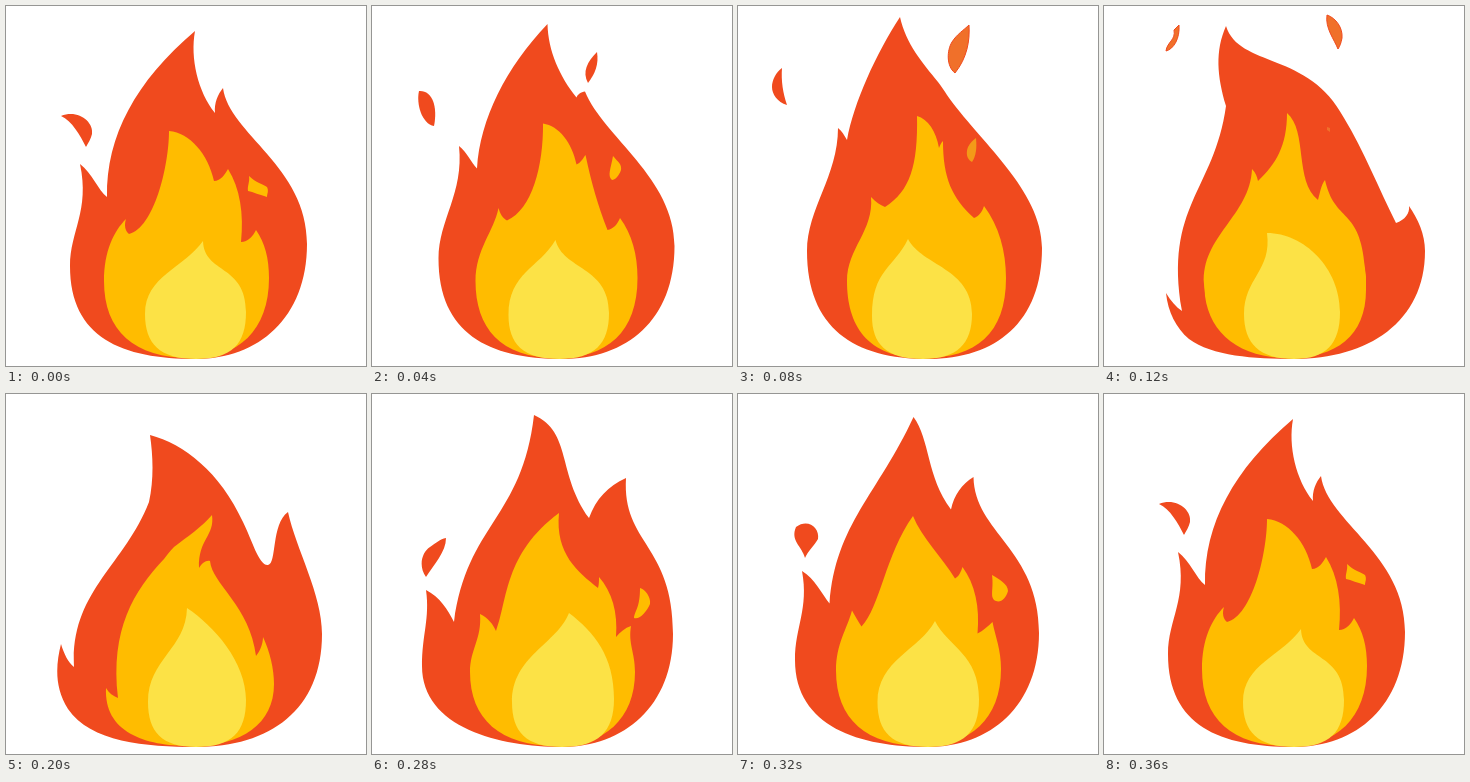
These frames come from a looping animation (360x360 px, 0.4 s). An HTML page:

```html
<!DOCTYPE html>
<html lang="en">
<head>
<meta charset="utf-8">
<title>Flame</title>
<style>
  html, body { margin: 0; width: 100%; height: 100%; overflow: hidden; background: #fff; }
  svg { display: block; width: 100%; height: 100%; }
</style>
</head>
<body>
<svg viewBox="0 0 360 360">
  <path id="outer" fill="#f04a1e"/>
  <path id="middle" fill="#ffbc00"/>
  <path id="inner" fill="#fce246"/>
  <g id="sparks"></g>
</svg>
<script>
const RED = '#f04a1e', AMBER = '#ffbc00', ORANGE = '#f0702a';
const LOOP = 400;

// Key poses: each flame layer as one closed curve.
const lean = {
  outer: 'M190 353C116 353 64 332 64 260C64 225 84 205 74 158C86 167 92 184 101 191C100 130 130 75 189 25C184 52 192 86 209 107C208 97 212 88 217 82C223 128 301 160 301 238C301 312 252 353 190 353Z',
  middle: 'M185 352C128 352 98 325 98 275C98 245 108 225 120 213C118 219 119 225 123 228C148 222 163 160 163 125C184 127 202 148 208 175C215 175 219 168 222 163C234 182 238 208 235 236C242 236 247 230 250 224C259 237 263 252 263 272C263 325 232 352 185 352Z',
  inner: 'M190 353C154 353 139 338 139 308C139 270 178 262 197 235C198 268 240 258 240 306C240 338 226 353 190 353Z',
  sparks: [
    [RED, 'M55 110C72 103 88 116 86 128C85 133 82 137 80 141C74 129 66 115 55 110Z'],
    [AMBER, 'M243 170C250 177 257 178 261 181C263 185 261 188 261 191C254 189 247 186 242 185C241 180 244 176 243 170Z']
  ]
};

const tall = {
  outer: 'M190 353C116 353 69 322 69 245C69 203 100 170 100 122C104 125 106 129 109 134C116 96 138 48 162 11C168 38 184 56 200 76C203 80 206 84 209 89C240 134 304 184 304 242C304 316 258 353 190 353Z',
  middle: 'M185 352C128 352 109 318 109 275C109 242 136 225 133 191C138 196 142 199 147 201C172 185 180 160 179 110C190 113 198 125 201 142C202 139 203 137 205 135C205 172 214 192 236 212C241 210 244 206 246 200C261 220 268 245 268 272C268 328 238 352 185 352Z',
  inner: 'M185 353C148 353 134 338 134 310C134 264 156 262 170 233C184 260 234 262 234 308C234 338 219 353 185 353Z',
  sparks: [
    [RED, 'M44 62C43 75 45 87 49 99C39 96 34 88 34 81C34 74 38 66 44 62Z'],
    [ORANGE, 'M231 19C232 35 229 52 217 67C208 60 209 44 214 36C219 28 226 24 231 19Z', RED],
    ['#f39a18', 'M238 132C239 142 238 150 234 156C228 153 228 146 230 141C232 137 235 134 238 132Z']
  ]
};

const curl = {
  outer: 'M190 353C150 353 108 350 85 333C72 322 64 306 62 287C67 295 72 301 78 305C60 200 110 185 122 100C113 70 111 45 122 20C135 62 205 45 240 112C260 145 275 183 292 217C301 214 306 207 305 200C314 213 321 228 321 245C321 316 264 353 190 353Z',
  middle: 'M185 352C136 352 106 328 101 290C101 286 100 282 100 278C97 230 146 210 148 163C152 167 153 171 154 175C172 158 183 140 183 107C204 125 190 175 214 194C216 187 217 179 221 174C231 218 256 200 261 262C261 265 262 268 262 271C262 276 262 280 262 284C262 330 232 352 185 352Z',
  inner: 'M190 353C156 353 140 338 140 308C140 272 168 265 163 227C200 227 236 262 236 306C236 338 222 353 190 353Z',
  sparks: [
    [ORANGE, 'M75 19C76 32 70 43 62 45C63 36 72 34 70 24Z', RED],
    [ORANGE, 'M223 9C232 12 239 22 238 32C237 37 236 40 234 43C230 33 221 22 223 9Z', RED],
    [ORANGE, 'M223 121L226 122L226 126L223 124Z']
  ]
};

const fork = {
  outer: 'M190 353C140 353 84 348 62 315C48 293 50 270 55 250C58 260 62 268 68 273C64 198 118 172 143 108C148 85 147 62 144 41C178 50 214 78 237 128C246 146 253 172 262 171C271 170 265 130 282 118C290 155 316 200 316 240C316 316 264 353 190 353Z',
  middle: 'M185 352C138 352 98 338 100 294C103 299 107 302 112 304C104 235 128 197 158 165C161 161 164 157 168 153C181 143 197 132 206 121C209 142 192 145 193 174C196 169 200 166 204 167C206 190 244 212 250 262C254 257 257 250 257 243C264 258 268 275 268 290C268 330 236 352 185 352Z',
  inner: 'M190 353C156 353 142 338 142 308C142 265 180 255 181 214C208 232 240 268 240 306C240 338 226 353 190 353Z',
  sparks: []
};

const split = {
  outer: 'M190 353C128 353 50 334 50 272C50 240 58 225 54 196C68 203 76 216 82 228C95 130 150 125 162 21C200 38 185 80 217 124C224 105 236 92 254 84C250 150 301 150 301 240C301 312 252 353 190 353Z',
  middle: 'M185 352C128 352 98 325 98 278C98 255 110 245 108 220C116 224 121 230 124 237C136 205 132 160 187 119C183 160 206 178 226 194C227 190 227 187 227 183C240 198 246 218 244 243C248 238 253 234 259 232C256 250 263 258 263 278C263 325 232 352 185 352Z',
  inner: 'M190 353C154 353 140 338 140 308C140 262 185 250 197 219C222 238 242 262 242 305C242 338 226 353 190 353Z',
  sparks: [
    [RED, 'M74 144C74 158 62 170 54 183C46 172 50 158 58 153C64 149 68 145 74 144Z'],
    [AMBER, 'M268 194C273 195 279 203 278 210C275 217 268 226 262 224C263 216 268 214 268 194Z']
  ]
};

const layers = ['outer', 'middle', 'inner'];

function mixPath(a, b) {
  const nums = b.match(/\d+/g);
  let i = 0;
  return a.replace(/\d+/g, n => (+n + +nums[i++]) / 2);
}

// Pose halfway between two others, with its own sparks.
function between(a, b, sparks) {
  const pose = { sparks };
  for (const id of layers) pose[id] = mixPath(a[id], b[id]);
  return pose;
}

const rise = between(lean, tall, [
  [RED, 'M47 85C60 84 66 100 62 120C50 118 44 98 47 85Z'],
  [RED, 'M225 46C227 58 223 68 216 77C210 66 215 56 225 46Z'],
  [AMBER, 'M241 150C246 156 250 158 249 164C247 170 243 174 240 174C235 170 239 162 241 150Z']
]);
const open = between(curl, fork, []);
const settle = between(split, lean, [
  [RED, 'M58 133C70 124 82 134 80 145C76 152 70 157 67 164C64 152 52 147 58 133Z'],
  [AMBER, 'M254 181C261 185 270 190 270 197C268 204 263 209 258 207C251 204 256 196 254 181Z']
]);

// One pose per 40 ms step.
const steps = [lean, rise, tall, curl, open, fork, fork, split, settle, lean];

const byId = id => document.getElementById(id);
let shown;

function draw(time) {
  const pose = steps[Math.floor(time % LOOP / LOOP * steps.length)];
  if (pose === shown) return;
  shown = pose;
  for (const id of layers) byId(id).setAttribute('d', pose[id]);
  byId('sparks').innerHTML = pose.sparks
    .map(([fill, d, stroke = 'none']) => `<path d="${d}" fill="${fill}" stroke="${stroke}"/>`)
    .join('');
}

const start = performance.now();
function tick() {
  draw(performance.now() - start);
  requestAnimationFrame(tick);
}
tick();
</script>
</body>
</html>
```
